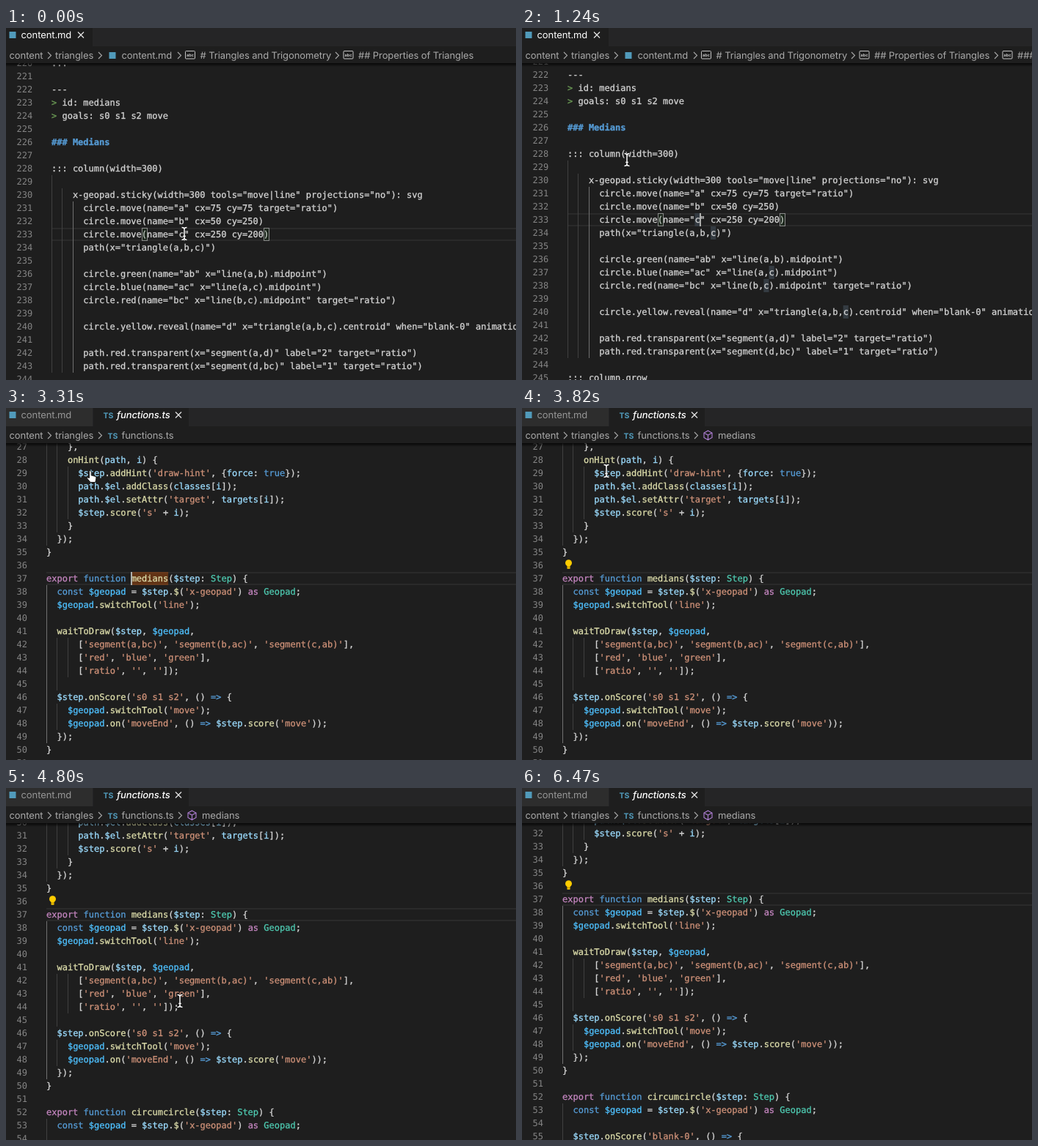
Recreate the animation shown at these times as an HTML page. Size 695 by 481 pixels, loop 6570 ms.

```html
<!DOCTYPE html>
<html lang="en">
<head>
<meta charset="utf-8">
<title>Editor: go to definition</title>
<style>
  html, body { margin: 0; width: 100%; height: 100%; overflow: hidden; background: #1e1e1e; }
  svg { display: block; width: 695px; height: 481px; }
  text { white-space: pre; text-rendering: geometricPrecision; }
  .code { font: 12px "DejaVu Sans Mono", Menlo, monospace; font-variant-ligatures: none; stroke-width: .3px; }
  .num { fill: #858585; }
  .ui { font: 13px Inter, "Open Sans", sans-serif; letter-spacing: -0.09px; fill: #a9a9a9; }
  .ts { font: 700 10.5px Inter, sans-serif; fill: #519aba; }
  .abc { font: 700 5.5px Inter, sans-serif; fill: #c5c5c5; }
</style>
</head>
<body>
<svg id="stage" viewBox="0 0 695 481"></svg>
<script>
const LOOP = 6570, CHAR = 7.2246, ROW = 18;
const stage = document.getElementById('stage');

function add(parent, tag, attrs = {}, text) {
  const node = document.createElementNS('http://www.w3.org/2000/svg', tag);
  for (const key in attrs) node.setAttribute(key, attrs[key]);
  if (text !== undefined) node.textContent = text;
  parent.appendChild(node);
  return node;
}
const group = (parent, attrs) => add(parent, 'g', attrs);
const rect = (parent, x, y, width, height, fill, more) =>
  add(parent, 'rect', { x, y, width, height, fill, ...more });
const line = (parent, d, stroke, width = 1) =>
  add(parent, 'path', { d, stroke, fill: 'none', 'stroke-width': width });
const show = (node, on) => node.setAttribute('display', on ? 'inline' : 'none');

// --- documents ---
const mdText = `:::

---
> id: medians
> goals: s0 s1 s2 move

### Medians

::: column(width=300)

    x-geopad.sticky(width=300 tools="move|line" projections="no"): svg
      circle.move(name="a" cx=75 cy=75 target="ratio")
      circle.move(name="b" cx=50 cy=250)
      circle.move(name="c" cx=250 cy=200)
      path(x="triangle(a,b,c)")

      circle.green(name="ab" x="line(a,b).midpoint")
      circle.blue(name="ac" x="line(a,c).midpoint")
      circle.red(name="bc" x="line(b,c).midpoint" target="ratio")

      circle.yellow.reveal(name="d" x="triangle(a,b,c).centroid" when="blank-0" animation="

      path.red.transparent(x="segment(a,d)" label="2" target="ratio")
      path.red.transparent(x="segment(d,bc)" label="1" target="ratio")

::: column.grow`;

const tsText = `    },
    onHint(path, i) {
      $step.addHint('draw-hint', {force: true});
      path.$el.addClass(classes[i]);
      path.$el.setAttr('target', targets[i]);
      $step.score('s' + i);
    }
  });
}

export function medians($step: Step) {
  const $geopad = $step.$('x-geopad') as Geopad;
  $geopad.switchTool('line');

  waitToDraw($step, $geopad,
      ['segment(a,bc)', 'segment(b,ac)', 'segment(c,ab)'],
      ['red', 'blue', 'green'],
      ['ratio', '', '']);

  $step.onScore('s0 s1 s2', () => {
    $geopad.switchTool('move');
    $geopad.on('moveEnd', () => $step.score('move'));
  });
}

export function circumcircle($step: Step) {
  const $geopad = $step.$('x-geopad') as Geopad;

  $step.onScore('blank-0', () => {`;

function mdTokens(src) {
  if (src.startsWith('###')) return [[src, '#569cd6', 'bold']];
  if (src.startsWith('>')) return [['>', '#6a9955'], [src.slice(1), '#d4d4d4']];
  return [[src, '#d4d4d4']];
}

function tsTokens(src) {
  const parts = src.match(/'[^']*'|=>|[$\w]+|\s+|./g) || [];
  let rest = src;
  return parts.map(part => {
    rest = rest.slice(part.length);
    return [part, tsColor(part, rest)];
  });
}

function tsColor(word, rest) {
  if (word[0] === "'") return '#ce9178';
  if (/^(export|as)$/.test(word)) return '#c586c0';
  if (/^(function|const|true|=>)$/.test(word)) return '#569cd6';
  if (/^(Step|Geopad)$/.test(word)) return '#4ec9b0';
  if (word === '$geopad') return '#4fc1ff';
  if (/^[$\w]+$/.test(word)) return rest[0] === '(' ? '#dcdcaa' : '#9cdcfe';
  return '#d4d4d4';
}

// Number of indent guides on each line; blank lines follow their neighbours.
function guideCounts(lines, offside) {
  const indent = lines.map(s => s ? s.search(/\S/) : -1);
  return indent.map((n, i) => {
    if (n >= 0) return n / 2;
    const above = indent[i - 1] ?? 0, below = indent[i + 1] ?? 0;
    if (above < below) return 1 + above / 2;
    return above === below || offside ? below / 2 : 1 + below / 2;
  });
}

function makeEditor({ text, first, left, anchor, anchorTop, tokens, offside, isActive }) {
  const root = group(stage), body = group(root);
  const x = col => left + col * CHAR;
  const y = n => anchorTop + (n - anchor) * ROW;
  const row = line(body, '', '#2a2a2a', 2);
  const marks = group(body), guides = group(body), active = group(body);
  const lines = text.split('\n'), counts = guideCounts(lines, offside);
  lines.forEach((src, i) => {
    const n = first + i;
    for (let level = 0; level < counts[i]; level++) {
      const gx = Math.round(x(level * 2));
      rect(guides, gx, y(n), 1, ROW, '#404040');
      if (isActive(n, level)) rect(active, gx, y(n), 1, ROW, '#707070');
    }
    add(body, 'text', { class: 'code num', x: 14.5, y: y(n) + 13 }, n);
    const t = add(body, 'text', { class: 'code', x: left, y: y(n) + 13 });
    for (const [part, fill, weight = 'normal'] of tokens(src))
      add(t, 'tspan', { fill, stroke: fill, 'font-weight': weight }, part);
  });
  const caret = rect(body, 0, 0, 2, ROW, '#aeafad');
  return {
    root, body, active, marks, x, y,
    mark: (n, col, len, fill, parent = marks) => rect(parent, x(col), y(n), len * CHAR, ROW, fill),
    brackets(n, ...cols) {
      const g = group(body);
      for (const c of cols)
        rect(g, Math.round(x(c)) + .5, y(n) + .5, 7, ROW - 1, 'rgba(0,100,0,.1)', { stroke: '#888' });
      return g;
    },
    setRow: n => row.setAttribute('d', `M${left} ${y(n) + 1}H700M${left} ${y(n) + ROW - 1}H700`),
    setCaret(pos) {
      show(caret, !!pos);
      if (!pos) return;
      caret.setAttribute('x', Math.floor(x(pos[1])));
      caret.setAttribute('y', y(pos[0]));
    },
    scroll: d => body.setAttribute('transform', `translate(0 ${-d})`)
  };
}

const md = makeEditor({
  text: mdText, first: 220, left: 62, anchor: 222, anchorTop: 75,
  tokens: mdTokens, offside: true, isActive: (n, level) => level === 2
});
const ts = makeEditor({
  text: tsText, first: 27, left: 55, anchor: 37, anchorTop: 224,
  tokens: tsTokens, offside: false, isActive: (n, level) => level === 0 && n > 37 && n < 50
});

const SOFT = '#343b42';
const cMarks = group(md.marks);
for (const [n, col] of [[233, 24], [234, 27], [237, 38], [238, 37], [240, 52]])
  md.mark(n, col, 1, SOFT, cMarks);
const wordMark = md.mark(223, 6, 7, SOFT);
const pair233 = md.brackets(233, 17, 40);
const pair228 = md.brackets(228, 10, 20);
const link = group(md.body);
md.mark(223, 6, 7, SOFT, link);
add(link, 'text', {
  class: 'code', x: md.x(6), y: md.y(223) + 13,
  style: 'fill:#4e94ce;text-decoration:underline'
}, 'medians');

const flash = ts.mark(37, 16, 7, 'rgba(234,92,0,.33)');
const bulb = group(ts.body, { fill: '#fc0' });
add(bulb, 'circle', { cx: 63.5, cy: ts.y(36) + 5.7, r: 4.5 });
rect(bulb, 61.5, ts.y(36) + 9, 4, 4.7, '#fc0');
line(bulb, `M61.5 ${ts.y(36) + 11.2}h4`, '#8a6d00', .7);

// --- tabs and breadcrumbs ---
const shade = add(add(stage, 'defs'), 'linearGradient', { id: 'shade', x2: 0, y2: 1 });
add(shade, 'stop', { offset: 0, 'stop-color': '#000', 'stop-opacity': .75 });
add(shade, 'stop', { offset: 1, 'stop-color': '#000', 'stop-opacity': 0 });
rect(stage, 0, 48, 695, 5, 'url(#shade)');
rect(stage, 0, 0, 695, 48, '#1e1e1e');
rect(stage, 0, 0, 695, 25, '#252526');

const label = (g, x, y, text, style = '') => add(g, 'text', { class: 'ui', x, y, style }, text);
const chevron = (g, x) => line(g, `M${x} 33l4.5 4.5l-4.5 4.5`, '#a9a9a9', 1.1);
const cross = (g, x) => line(g, `M${x - 4} 5.5l8 8m0 -8l-8 8`, '#e8e8e8', 1.2);
const fileDot = (g, x, y) => rect(g, x - 4.5, y - 4.5, 9, 9, '#519aba');
function section(g, x, text) {
  rect(g, x + .5, 31.5, 13, 10.5, 'none', { stroke: '#c5c5c5', rx: 1 });
  add(g, 'text', { class: 'abc', x: x + 2, y: 38.6 }, 'abc');
  label(g, x + 20.5, 42, text);
}

const common = group(stage);
label(common, 4.5, 42, 'content');
chevron(common, 57);
label(common, 67, 42, 'triangles');
chevron(common, 126);

const mdHead = group(stage);
rect(mdHead, 0, 0, 118, 25, '#1e1e1e');
fileDot(mdHead, 9, 9.5);
label(mdHead, 20.5, 14, 'content.md', 'fill:#fff');
cross(mdHead, 102);
fileDot(mdHead, 145, 37.5);
label(mdHead, 157.5, 42, 'content.md');
chevron(mdHead, 234);
section(mdHead, 244, '# Triangles and Trigonometry');
chevron(mdHead, 449);
section(mdHead, 459.5, '## Properties of Triangles');
const deepCrumb = group(mdHead);
chevron(deepCrumb, 644);
section(deepCrumb, 654.5, '### Medians');

const tsHead = group(stage);
rect(tsHead, 0, 0, 118, 25, '#2d2d2d');
rect(tsHead, 119, 0, 130, 25, '#1e1e1e');
fileDot(tsHead, 9, 9.5);
label(tsHead, 20.5, 14, 'content.md', 'fill:#969696');
add(tsHead, 'text', { class: 'ts', x: 132.5, y: 13.5 }, 'TS');
label(tsHead, 151, 14, 'functions.ts', 'fill:#fff;font-style:italic;font-weight:500');
cross(tsHead, 235);
add(tsHead, 'text', { class: 'ts', x: 138.5, y: 41.5 }, 'TS');
label(tsHead, 157.5, 42, 'functions.ts');
const symbol = group(tsHead);
chevron(symbol, 235);
line(symbol, 'M253.5 31l5.5 3v6.5l-5.5 3l-5.5 -3v-6.5zM248 34l5.5 3l5.5 -3M253.5 37v6.5', '#b180d7', 1.1);
label(symbol, 267, 42, 'medians');

// --- pointer ---
const mouse = group(stage);
const beam = group(mouse), hand = group(mouse);
const beamPath = 'M-3.5 -8.5Q0 -8.5 0 -6Q0 -8.5 3.5 -8.5M0 -6.5V6.5M-3.5 8.5Q0 8.5 0 6Q0 8.5 3.5 8.5M-1.8 3.5h3.6';
line(beam, beamPath, '#111', 2.8);
line(beam, beamPath, '#fff', 1.5);
add(hand, 'path', {
  d: 'M-1.5 0.5q1.3 -1.6 2.6 0v5.5l5.6 1.4q1.6 .6 1.2 2.6l-1.1 5.5h-6.8l-4.6 -5.6q.4 -1.7 3.1 -.3z',
  fill: '#fff', stroke: '#111', 'stroke-width': .9
});

// --- timeline ---
// [first change, last change, count]: the picture holds between changes.
const bursts = [
  [0, 0, 1], [120, 440, 5], [610, 670, 2], [760, 1240, 8], [1290, 1350, 2], [1620, 2080, 9],
  [2260, 2350, 2], [2590, 2590, 1], [3070, 3070, 1], [3310, 3430, 3], [3580, 3820, 3],
  [4300, 4420, 3], [4650, 4800, 3], [4880, 5060, 3], [5270, 5270, 1], [5720, 5840, 3],
  [6310, 6310, 1], [6470, 6470, 1]
];
const changes = bursts.flatMap(([a, b, n]) =>
  Array.from({ length: n }, (_, i) => n > 1 ? a + (b - a) * i / (n - 1) : a));

const mousePath = [
  [40, 243, 281], [440, 209, 221], [700, 209, 221], [1240, 143, 180], [1560, 143, 180],
  [2080, 115, 86], [4240, 115, 86], [4420, 237, 291], [5660, 237, 291], [5780, 500, 453]
];
const mdScroll = [[540, 0], [670, 13], [900, 19], [1100, 20]];
const tsScroll = [[4575, 0], [4800, 60], [4900, 74], [5060, 81]];
// [from, to, line, column]
const mdCaret = [
  [0, 440, 233, 25], [1000, 1290, 233, 25], [1290, 1790, 228, 11],
  [2080, 2590, 223, 8], [3070, 3310, 223, 8]
];
const tsCaret = [[3310, 3820], [4300, 4800], [5270, 5780], [6310, 6470]].map(s => [...s, 37, 16]);

const smooth = u => u * u * (3 - 2 * u);
function along(keys, t, k, ease = u => u) {
  if (t <= keys[0][0]) return keys[0][k];
  for (let i = 1; i < keys.length; i++) {
    const a = keys[i - 1], b = keys[i];
    if (t < b[0]) return a[k] + (b[k] - a[k]) * ease((t - a[0]) / (b[0] - a[0]));
  }
  return keys[keys.length - 1][k];
}
function caretAt(spans, t) {
  const span = spans.find(([from, to]) => t >= from && t < to);
  return span && span.slice(2);
}

function draw(now) {
  let t = 0;
  for (const c of changes) if (c <= now + .01) t = c;
  const within = (a, b) => t >= a && t < b;
  const inMd = t < 3310;

  show(md.root, inMd);
  show(mdHead, inMd);
  show(ts.root, !inMd);
  show(tsHead, !inMd);

  md.scroll(Math.round(along(mdScroll, t, 1)));
  md.setRow(t < 1290 ? 233 : t < 2080 ? 228 : 223);
  md.setCaret(caretAt(mdCaret, t));
  show(md.active, t < 1290);
  show(cMarks, within(120, 1290));
  show(pair233, t < 1290);
  show(pair228, within(1290, 2080));
  show(wordMark, t >= 2260);
  show(link, t >= 3070);
  show(deepCrumb, within(120, 2350));

  ts.scroll(Math.round(along(tsScroll, t, 1)));
  ts.setRow(37);
  ts.setCaret(caretAt(tsCaret, t));
  show(flash, t < 3700);
  show(bulb, t >= 3580);
  show(symbol, t >= 3370);

  const pointing = within(3070, 3430);
  show(mouse, t < 5840);
  show(beam, !pointing);
  show(hand, pointing);
  mouse.setAttribute('transform',
    `translate(${along(mousePath, t, 1, smooth)} ${along(mousePath, t, 2, smooth)})`);
}

const start = performance.now();
function tick() {
  draw((performance.now() - start) % LOOP);
  requestAnimationFrame(tick);
}
tick();
</script>
</body>
</html>
```
